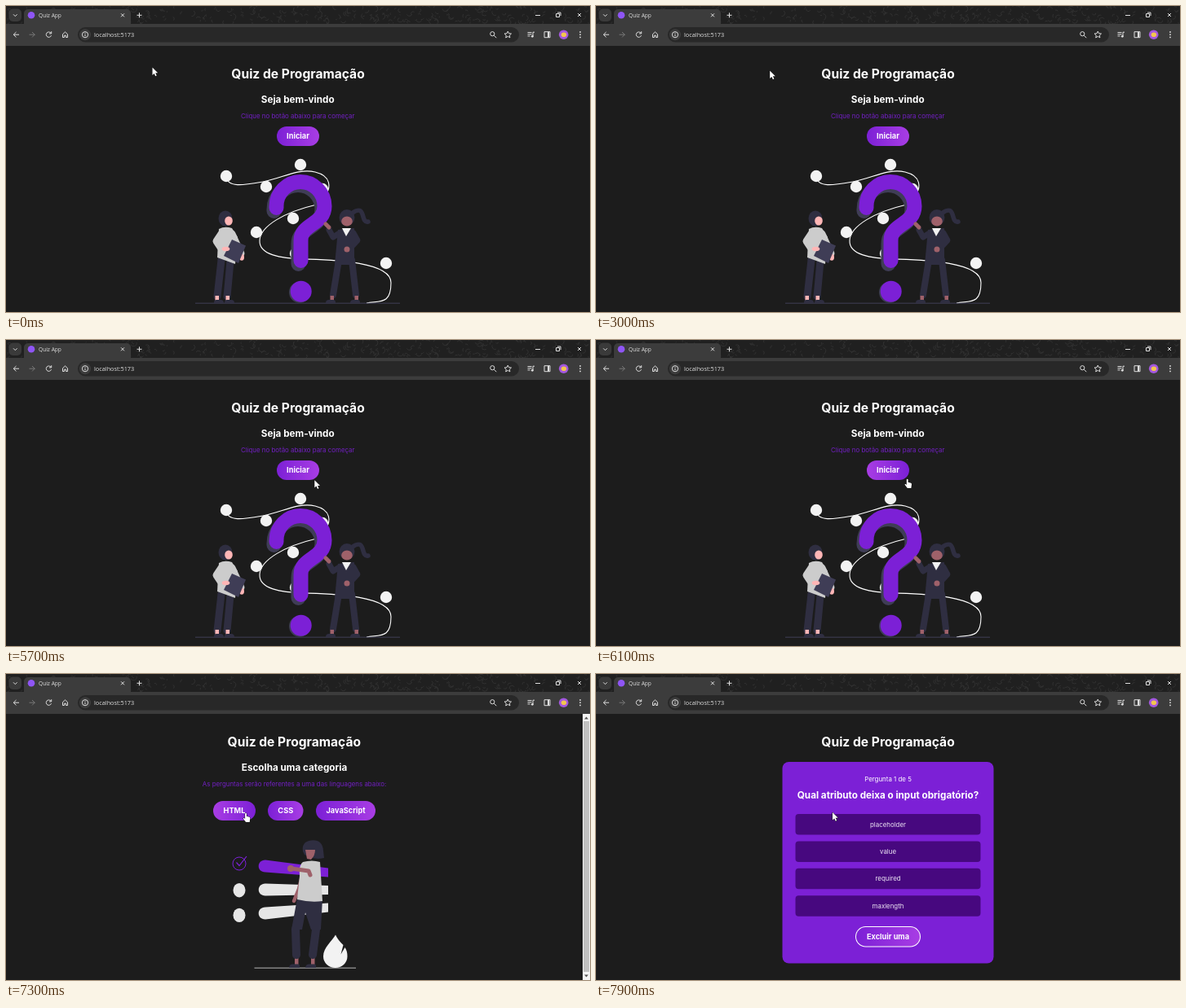
Recreate the animation shown at these times as an HTML page with a canvas. Size 716x376 px, loop 8000 ms.

```html
<!DOCTYPE html>
<html lang="pt-BR">
<head>
<meta charset="utf-8">
<title>Quiz App</title>
<style>
html, body { margin: 0; width: 100%; height: 100%; overflow: hidden; background: #1c1c1c; }
canvas { display: block; }
</style>
</head>
<body>
<canvas id="stage" width="716" height="376"></canvas>
<script>
const ctx = document.getElementById('stage').getContext('2d');
const LOOP = 8000, CATEGORIES_AT = 6200, QUESTION_AT = 7800;
const PURPLE = '#7c20d6', LILAC = '#a83de4', NAVY = '#2f2e41', SLATE = '#3f3d56';
const ROSE = '#ffb6b6', TAN = '#9f616a', PALE = '#f2f2f2', GREY = '#cccccc', INK = '#dedede';
const SIZE = { title: 15.6, subtitle: 11.7, button: 9.2, body: 7.9 };

function fill(path, color) {
  ctx.fillStyle = color;
  ctx.fill(new Path2D(path));
}

function stroke(path, color, width = 1) {
  ctx.strokeStyle = color;
  ctx.lineWidth = width;
  ctx.stroke(new Path2D(path));
}

function oval(x, y, rx, color, ry = rx) {
  ctx.fillStyle = color;
  ctx.beginPath();
  ctx.ellipse(x, y, rx, ry, 0, 0, 7);
  ctx.fill();
}

function ring(x, y, r, color = INK) {
  ctx.strokeStyle = color;
  ctx.lineWidth = 1;
  ctx.beginPath();
  ctx.arc(x, y, r, 0, 7);
  ctx.stroke();
}

function box(x, y, w, h, r, color) {
  ctx.fillStyle = color;
  ctx.beginPath();
  ctx.roundRect(x, y, w, h, r);
  ctx.fill();
}

function at(x, y, paint) {
  ctx.save();
  ctx.translate(x, y);
  paint();
  ctx.restore();
}

const icon = (x, y, path, color = INK) => at(x, y, () => stroke(path, color));

// A thick rounded line: arms, legs and other soft strokes.
function limb(path, color, width) {
  ctx.save();
  ctx.lineCap = ctx.lineJoin = 'round';
  stroke(path, color, width);
  ctx.restore();
}

function text(str, x, y, size, { color = '#fff', weight = 400, align = 'center', family = 'Inter' } = {}) {
  ctx.font = `${weight} ${size}px "${family}", sans-serif`;
  ctx.textAlign = align;
  ctx.fillStyle = color;
  ctx.fillText(str, x, y);
}

const bold = (str, x, y, size) => text(str, x, y, size, { weight: 700 });
const label = (str, x, y, size) => text(str, x, y, size, { color: INK, align: 'left', family: 'Open Sans' });

// Draws a button and tells whether the mouse is over it.
function button(str, x, y, w, mouse, h = 24) {
  const over = mouse.x > x && mouse.x < x + w && mouse.y > y && mouse.y < y + h;
  const shade = ctx.createLinearGradient(x, 0, x + w, 0);
  shade.addColorStop(0, over ? LILAC : PURPLE);
  shade.addColorStop(1, over ? PURPLE : LILAC);
  box(x, y, w, h, h / 2, shade);
  bold(str, x + w / 2, y + h / 2 + 3.4, SIZE.button);
  return over;
}

function doodles() {
  let seed = 7;
  const random = () => (seed = (seed * 16807) % 2147483647) / 2147483647;
  for (let i = 0; i < 340; i++) {
    const turn = random() * 7;
    ctx.strokeStyle = '#343434';
    ctx.lineWidth = 0.9;
    ctx.beginPath();
    ctx.arc(random() * 716, random() * 22, 1 + random() * 3, turn, turn + 1 + random() * 2);
    ctx.stroke();
  }
}

function tabStrip() {
  const cross = 'M-2-2L2 2M2-2L-2 2';
  box(0, 0, 716, 22, 0, '#202020');
  doodles();
  box(3.5, 3.5, 15.5, 15.5, 5, '#3a3a3a');
  icon(11.3, 11.3, 'M-2.300-1L0 1.300 2.300-1');
  box(22, 4, 131, 26, 5, '#3c3c3c');
  oval(31, 11.3, 4.3, '#8f55f5');
  label('Quiz App', 40, 14.3, 6.6);
  icon(143, 11.3, cross);
  icon(163.5, 11.3, 'M-3 0H3M0-3V3');
  icon(652, 11.5, 'M-3 0H3');
  icon(677, 11.5, 'M-2.500-2h4v4h-4zM-1-3.500h4v4');
  icon(703, 11, cross);
}

function toolbar() {
  const y = 35.2, arrow = 'M3.500 0H-3.500M0-3.200L-3.200 0 0 3.200';
  box(0, 22, 716, 27, 0, '#3c3c3c');
  box(88, 26, 541, 18.5, 9.25, '#282828');
  icon(12.5, y, arrow);
  at(32, y, () => { ctx.scale(-1, 1); stroke(arrow, '#777'); });
  icon(52.5, y, 'M2.500-2A3.200 3.200 0 1 0 3 1M3.200-4v2.700H.5');
  icon(72.5, y, 'M-3-.5V3.300H-1V1H1V3.300H3V-.5L0-3.300z');
  oval(97, y, 7, '#3c3c3c');
  ring(97, y, 3.6);
  icon(97, y, 'M0-.4V2M0-2.300v1');
  label('localhost:5173', 108, 37.8, 7.3);
  ring(596.3, 34.2, 2.6);
  icon(598.3, 36.2, 'M0 0L3 3');
  icon(615.3, y, 'M0-4.200L1.200-1.500 4.200-1.200 2 1 2.600 3.700 0 2.200-2.600 3.700-2 1-4.200-1.200-1.200-1.500z');
  icon(643, y, 'M-3.500-2.700h5M-3.500-.5h5M-3.500 1.700h3M3 2v-5h2');
  oval(645.3, 37.3, 1.4, INK);
  icon(663.5, y, 'M-3.500-3.500h7v7h-7zM2-3.500v7M1-3.500v7');
  oval(683.7, y, 5.8, '#a458df');
  oval(683.9, y, 3.2, '#f3c64f', 2.8);
  for (let i = -1; i <= 1; i++) oval(704, y + i * 3.2, 0.9, INK);
}

function questionMark(dx, dy, color) {
  at(dx, dy, () => limb('M331.500 248V246A29.500 30 0 0 1 390.500 246C390.500 269 361.500 267 361.500 288V313', color, 18));
}

function man() {
  limb('M264 312L259 357M275 314L271 357', NAVY, 9);
  for (const x of [259, 272]) {
    box(x - 2.5, 356, 4.5, 6, 0, ROSE);
    box(x - 4, 361, 12, 4, [3, 4, 0, 0], NAVY);
  }
  limb('M264 280L258 289 264 298M277 280L288 304', GREY, 9);
  fill('M261 274Q268 270 277 273L284 284 281 317 259 309Z', GREY);
  oval(289, 308.7, 3, ROSE, 4);
  fill('M277 287L294 294.500 285 316 267 307Z', SLATE);
  oval(269.5, 298.5, 4.8, ROSE, 2.8);
  oval(269, 261, 8.5, NAVY, 9.5);
  oval(273, 264, 4.8, ROSE, 5.5);
}

function speaker() {
  limb('M425 254C442 243 434 267 444 265', NAVY, 5.5);
  limb('M408 312L401 355M424 312L429 355', NAVY, 8);
  for (const x of [400, 430]) {
    box(x - 2.5, 356, 4.5, 6, 0, TAN);
    box(x - 8, 361, 12, 4, [4, 3, 0, 0], NAVY);
  }
  limb('M409 279L401 284 396 275M426 279L431 288 421 299', NAVY, 7);
  fill('M407 275L427 273 427 318 403 318Z', NAVY);
  fill('M412 273L417 283 423 273Z', PALE);
  limb('M396 272L392 268', TAN, 5);
  oval(418, 299, 3.5, TAN);
  oval(418, 260, 9.5, NAVY, 10);
  oval(418, 264.5, 6.8, TAN, 6);
}

function welcomeArt() {
  stroke('M270 209C271 224 292 220 315 216S358 199 379 204 397 224 393 230', '#fff', 1.1);
  stroke('M381 244C342 253 312 270 311 288S337 310 366 311 472 313 472 340 459 362 442 365', '#fff', 1.1);
  limb('M270 209h0M361 195h0M319 222h0M388 225h0M352 261h0M307 278h0M355 304h0M466 316h0', PALE, 14.4);
  questionMark(-3, 4, SLATE);
  questionMark(0, 0, PURPLE);
  oval(360, 351.7, 13, SLATE);
  oval(361.7, 350.7, 13, PURPLE);
  stroke('M232 365.200H483', SLATE);
  man();
  speaker();
}

function checklist() {
  ring(286, 233, 8, PURPLE);
  stroke('M282.500 231.500L286 235.500 295 224', PURPLE, 1.2);
  for (let row = 0; row < 3; row++) {
    const y = 236 + row * 29, tilt = 8 - row * 7.5;
    const color = row ? '#e6e6e6' : PURPLE;
    if (row) oval(286, 235 + row * 30.7, 7.5, color, 8.7);
    fill(`M318 ${y - 7.5}L395 ${y + tilt - 5.5}V${y + tilt + 5.5}L318 ${y + 7.5}C307 ${y + 7.5} 307 ${y - 7.5} 318 ${y - 7.5}Z`, color);
  }
}

function categoryArt() {
  checklist();
  stroke('M304.500 361.200H429', '#b5b5b5');
  limb('M364 244L359 264 353 279', TAN, 4.5);
  for (const x of [356, 376]) {
    box(x - 2, 347, 4.5, 11, 0, TAN);
    box(x - 9, 356.5, 13, 4.5, [5, 2, 0, 0], NAVY);
  }
  limb('M364 284L355 314 356 345M379 284L380 314 376 345', NAVY, 10);
  fill('M357 276H388L386 314H374L367 293 363 314H350Z', NAVY);
  fill('M364 231Q375 228 385 231L388 279Q373 281 357 277L360 248Q359 234 364 231Z', GREY);
  limb('M350 239L371 242 373 247', TAN, 5);
  oval(349, 239, 4, TAN);
  fill('M364 218Q362 206 374 204.500 388 203 389 217L390 226Q377 229 366 222Z', NAVY);
  fill('M367 216H379Q379 223 374 228L369 227Z', TAN);
  fill('M404 320.500C400 328 389 336 389 347A14.700 14 0 0 0 418.500 347Q418.500 340 415.500 336L410.500 344.500 413.500 333Q407 327 404 320.500Z', PALE);
}

function scrollbar() {
  box(707, 49, 9, 327, 0, '#f4f4f4');
  box(708, 58, 7, 308, 0, '#c1c1c1');
  fill('M709 55.500h5l-2.500-3zM709 369.500h5l-2.500 3z', '#555');
}

function heading(title, note, x) {
  bold(title, x, 119.3, SIZE.subtitle);
  text(note, x, 138, SIZE.body, { color: '#721fc3' });
}

function welcome(mouse) {
  heading('Seja bem-vindo', 'Clique no botão abaixo para começar', 357.7);
  welcomeArt();
  return button('Iniciar', 332, 148, 52, mouse);
}

function categories(mouse) {
  heading('Escolha uma categoria', 'As perguntas serão referentes a uma das linguagens abaixo:', 353.5);
  categoryArt();
  scrollbar();
  const overs = [
    button('HTML', 254, 156, 52, mouse),
    button('CSS', 321, 156, 43.5, mouse),
    button('JavaScript', 380, 156, 73, mouse)
  ];
  return overs.includes(true);
}

function question(mouse) {
  box(228.5, 108, 259, 247.5, 8, PURPLE);
  text('Pergunta 1 de 5', 358, 131.6, SIZE.body);
  bold('Qual atributo deixa o input obrigatório?', 358, 153.2, SIZE.subtitle);
  ['placeholder', 'value', 'required', 'maxlength'].forEach((answer, i) => {
    const y = 172 + i * 33.4;
    box(244.5, y, 227, 25.5, 4, '#47087f');
    text(answer, 358, y + 15.6, SIZE.body, { color: '#eee6f5' });
  });
  box(318, 310, 80, 25.5, 12.75, '#fff');
  return button('Excluir uma', 319, 311, 78, mouse, 23.5);
}

// Resting places of the mouse: time, x, y.
const STOPS = [
  [0, 179.5, 75.5], [100, 213.2, 79.5], [3500, 546.5, 14.5], [4200, 693.2, 176.7],
  [5200, 555.3, 174.3], [5700, 378.3, 172.2], [6000, 381.7, 170], [6200, 370, 162.7],
  [7000, 343, 168], [7100, 320, 168], [7300, 294, 170], [7800, 290, 170]
];

function mouseAt(t) {
  const i = STOPS.findLastIndex(stop => stop[0] <= t);
  const [, x, y] = STOPS[i];
  if (t < 4000 || t >= 4200) return { x, y };
  // The one long sweep is seen in ten steps a second, slowing down.
  const [, endX, endY] = STOPS[i + 1];
  const left = (1 - (Math.floor(t / 100) - 39) / 3) ** 1.5;
  return { x: endX + (x - endX) * left, y: endY + (y - endY) * left };
}

function pointer({ x, y }, hand) {
  const path = hand
    ? 'M2.600 1.500Q3.500 0 4.400 1.500V4.800L8 5.800Q9 6.200 8.800 7.500L8.200 12H3.600L.5 8Q0 6.600 1.500 7L2.600 8Z'
    : 'M0 0V9.400L2.200 7.400 3.700 10.700 5.200 10 3.700 6.800H6.700Z';
  at(x - (hand ? 3.5 : 0), y, () => {
    stroke(path, '#111');
    fill(path, '#fff');
  });
}

function draw(t) {
  const mouse = mouseAt(t);
  const page = t < CATEGORIES_AT ? welcome : t < QUESTION_AT ? categories : question;
  box(0, 0, 716, 376, 0, '#1c1c1c');
  tabStrip();
  toolbar();
  bold('Quiz de Programação', page === categories ? 353.3 : 358, 88.7, SIZE.title);
  pointer(mouse, page(mouse));
}

const start = performance.now();
function tick() {
  draw((performance.now() - start) % LOOP);
  requestAnimationFrame(tick);
}
tick();
</script>
</body>
</html>
```
